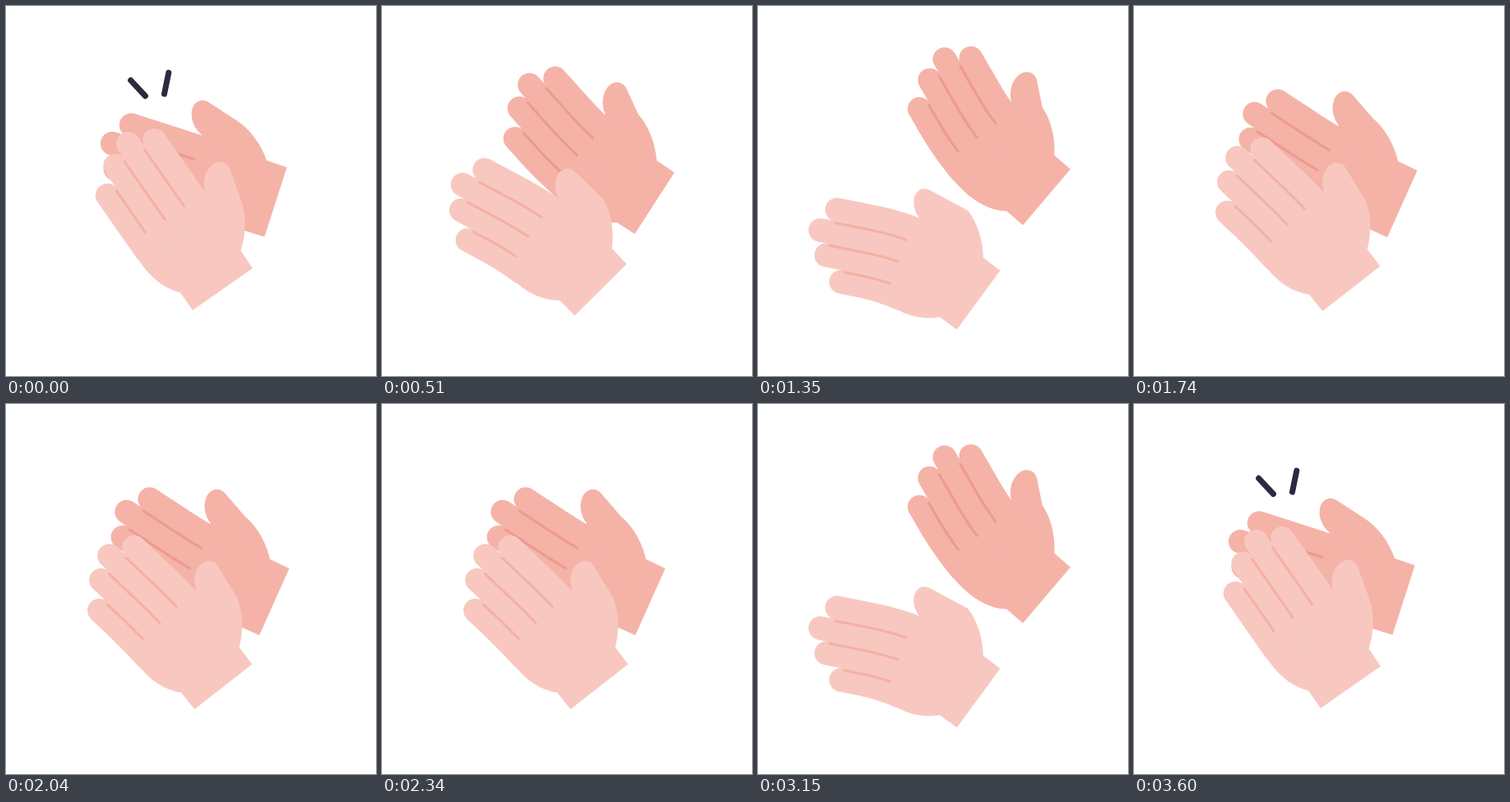
An HTML page that plays this animation: 450x450 px, repeating every 3.63 s.

```html
<!DOCTYPE html>
<html lang="en">
<head>
<meta charset="utf-8">
<title>Clapping hands</title>
<style>
  html, body { margin: 0; width: 100%; height: 100%; overflow: hidden; background: #fff; }
  svg { display: block; width: 100vw; height: 100vh; }
  path { stroke-linecap: round; stroke-linejoin: round; }
</style>
</head>
<body>
<svg id="stage" viewBox="0 0 450 450"></svg>
<script>
const STEP = 30, FRAMES = 121, CLAP = 10, LAST = 10;
const DEG = Math.PI / 180;
const stage = document.getElementById('stage');

// One hand, measured from the middle of the wrist:
// u runs towards the fingertips, v towards the thumb.
const TIPS = [196, 211, 198, 174];      // finger lengths, index to little
const GAP = 28.4, INDEX = 35.5;         // finger spacing, v of the index finger
const KNUCKLE = 110;
const ARC = [30, 150];                  // stretch of the hand that curves
const THUMB_PIVOT = [70, 50];
const WRIST = [[26, -44.5], [0, -44.5], [0, 44.5], [26, 45], [37, 60], [56, 75], [75, 80]];
const THUMB = [[114, 90.5], [126, 94], [133, 84], [131, 74], [128, 58], [110, 50]];
const HEEL = [[KNUCKLE, 36], [KNUCKLE, -50], [85, -63.5], [60, -64], [40, -57], [26, -44.5]];

// Inner and outer end of each spark
const SPARKS = [[169.5, 109.5, 111, 46.5], [192.5, 107, 210, 22]];

function add(tag, attrs, parent = stage) {
  const el = document.createElementNS('http://www.w3.org/2000/svg', tag);
  for (const k in attrs) el.setAttribute(k, attrs[k]);
  return parent.appendChild(el);
}

function makeHand(look) {
  const group = add('g', { fill: 'none' });
  return {
    ...look,
    group,
    palm: add('path', { fill: look.skin }, group),
    fingers: add('path', { stroke: look.skin, 'stroke-width': 28.8 }, group),
    creases: add('path', { stroke: look.line, 'stroke-width': 3.2 }, group)
  };
}

// at: wrist; drift and kick: its slow and late travel; angle, swing and bend in degrees
const hands = [
  makeHand({ skin: '#f5b3a8', line: '#ee9a90', lag: 0.35, at: [328, 238.5],
    drift: [-8.5, 8.5], kick: [31.6, -14.5], angle: -72.2, swing: 22.6, bend: 19.5 }),
  makeHand({ skin: '#f8c8c0', line: '#f5b0a4', lag: 0, at: [263.5, 344.5],
    drift: [4.7, -3.8], kick: [0, 17], angle: -34.9, swing: -18.8, bend: -25 })
];
const sparks = SPARKS.map(() => add('path', { stroke: '#2b2a40', 'stroke-width': 7 }));

const ease = u => {
  u = Math.min(1, Math.max(0, u));
  return u * u * (3 - 2 * u);
};

// Bends a point along a circular arc, straight beyond its end
function curl([u, v], bend) {
  const [from, to] = ARC;
  const len = Math.min(Math.max(u - from, 0), to - from), rest = u - from - len;
  const a = bend * len / (to - from);
  return [
    from + len * Math.cos(a / 2) + rest * Math.cos(a) - v * Math.sin(a),
    len * Math.sin(a / 2) + rest * Math.sin(a) + v * Math.cos(a)
  ];
}

function turn([u, v], a) {
  const [pu, pv] = THUMB_PIVOT, c = Math.cos(a), s = Math.sin(a);
  return [pu + (u - pu) * c - (v - pv) * s, pv + (u - pu) * s + (v - pv) * c];
}

const xy = ([u, v]) => v.toFixed(2) + ' ' + (-u).toFixed(2) + ' ';

// Fills each # of a template with the next point
function trace(template, points) {
  let i = 0;
  return template.replace(/#/g, () => xy(points[i++]));
}

// A line of constant v, curled with the hand
function ray(v, from, to, bend) {
  const n = 10, points = [];
  for (let i = 0; i <= n; i++) points.push(curl([from + (to - from) * i / n, v], bend));
  return 'M' + points.map(xy).join('L');
}

function drawHand(hand, r) {
  const flex = hand.bend * DEG * r ** 0.6;
  const place = i => hand.at[i] + hand.drift[i] * r + hand.kick[i] * r ** 3;
  hand.group.setAttribute('transform',
    `translate(${place(0)} ${place(1)}) rotate(${hand.angle + hand.swing * r})`);

  hand.palm.setAttribute('d', trace('M#L#L#L#C###L#C###Q##L#L#L#C###Z', [
    ...WRIST,
    ...THUMB.map(p => turn(p, flex * 0.8)),
    ...HEEL.map(p => curl(p, flex))
  ]));

  let fingers = '', creases = '';
  TIPS.forEach((tip, i) => {
    const v = INDEX - GAP * i;
    fingers += ray(v, KNUCKLE - 20, tip, flex);
    if (i) creases += ray(v + GAP / 2 - 2, KNUCKLE, Math.min(tip, TIPS[i - 1]) - 2, flex);
  });
  hand.fingers.setAttribute('d', fingers);
  hand.creases.setAttribute('d', creases);
}

// 0 when the palms meet, 1 when they are furthest apart
function openness(f, lag) {
  const k = Math.floor(f / CLAP), ph = f - k * CLAP;
  const settle = LAST * CLAP + 8;
  if (f > settle) return openness(settle, lag) * ((FRAMES - 1 - f) / 12) ** 2;
  const rise = 3.2 + 0.1 * k;
  return ph < 5 ? ease(ph / rise) : 1 - ease((ph - 5.15 - lag) / 3.85);
}

function drawSparks(f) {
  const k = Math.round(f / CLAP), ph = f - k * CLAP;
  const head = ease((ph + 1.1) / 3), tail = ease(ph / 3.4);
  const shown = k !== LAST + 1 && head > 0 && tail < 1;
  SPARKS.forEach(([x, y, X, Y], i) => {
    const at = u => `${x + (X - x) * u} ${y + (Y - y) * u}`;
    sparks[i].setAttribute('d', shown ? `M${at(tail)}L${at(head)}` : '');
  });
}

function draw(ms) {
  const f = Math.floor(ms / STEP) % FRAMES;
  hands.forEach(h => drawHand(h, openness(f, h.lag)));
  drawSparks(f);
}

let start;
function tick(now) {
  if (start === undefined) start = now;
  draw(Math.max(0, now - start));
  requestAnimationFrame(tick);
}
draw(0);
requestAnimationFrame(tick);
</script>
</body>
</html>
```
